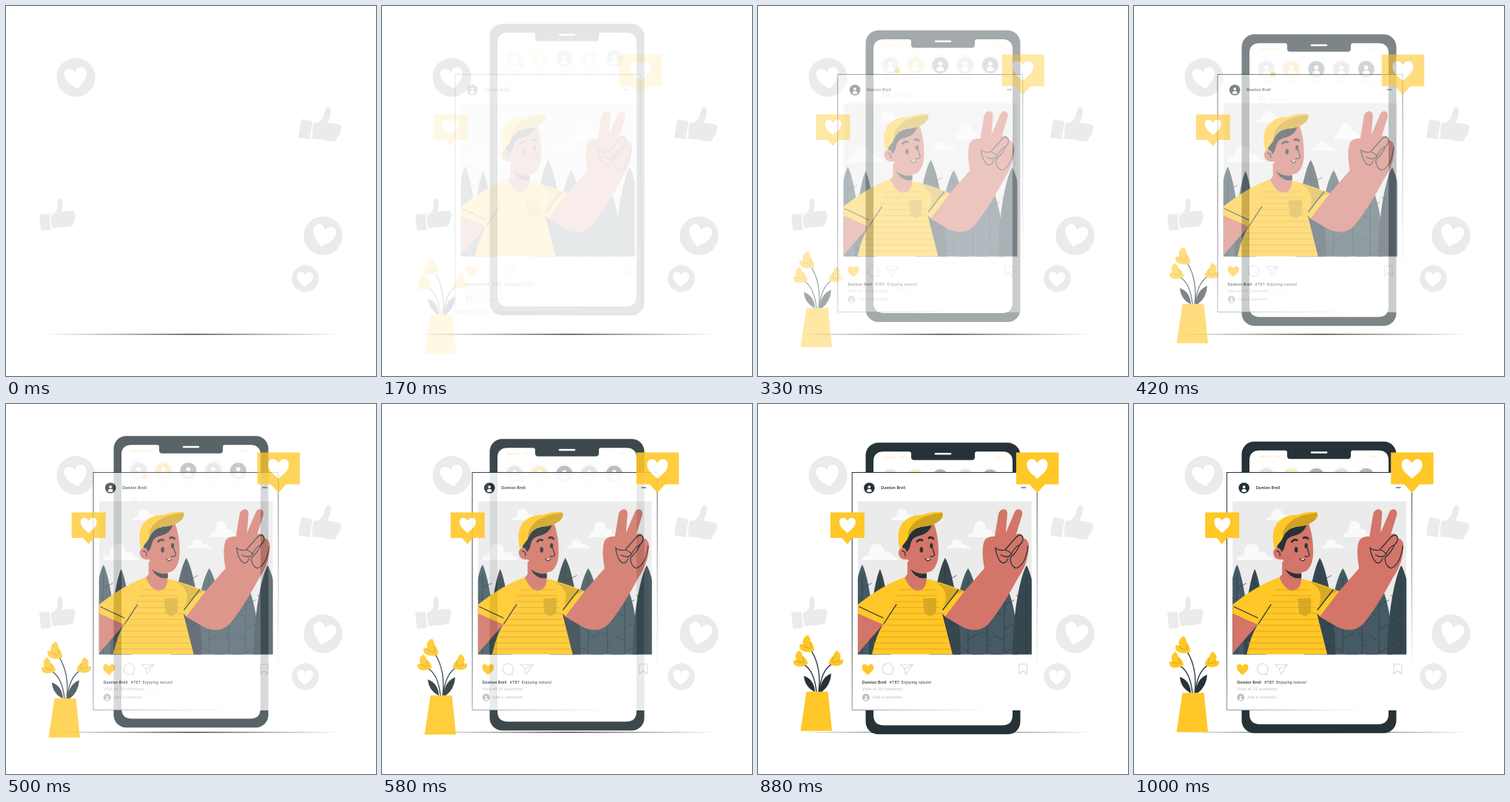
Write an HTML page that moves like this. It is 500 by 500 pixels and loops after 1040 ms.

```html
<!DOCTYPE html>
<html lang="en">
<head>
<meta charset="utf-8">
<title>Photo post</title>
<style>
  html, body { margin: 0; width: 100%; height: 100%; overflow: hidden; background: #fff; }
  svg { display: block; width: 100vw; height: 100vh; }
  text { font: 5.2px Lato, "Open Sans", sans-serif; letter-spacing: .25px; fill: #263238; }
  .bold { font-weight: 700; }
  .pale { fill: #b9b9b9; }
  .yellow { fill: #ffc727; }
  .amber { fill: #cfa320; }
  .skin { fill: #d37568; }
  .dark { fill: #263238; }
  .white { fill: #fff; }
  .grey { fill: #ebebeb; }
  .ink { fill: none; stroke: #263238; stroke-width: 1.3; stroke-linecap: round; stroke-linejoin: round; }
  .brow { stroke-width: 2.8; }
  .icon { fill: none; stroke: #dadada; stroke-width: 1.1; stroke-linejoin: round; }
</style>
</head>
<body>
<svg viewBox="0 0 500 500">
  <defs>
    <linearGradient id="floor">
      <stop stop-color="#555" stop-opacity="0"/>
      <stop offset=".5" stop-color="#444"/>
      <stop offset="1" stop-color="#555" stop-opacity="0"/>
    </linearGradient>
    <linearGradient id="edge" gradientUnits="userSpaceOnUse" x1="125" y1="93" x2="376" y2="413">
      <stop offset=".35" stop-color="#263238"/>
      <stop offset=".9" stop-color="#fff"/>
    </linearGradient>
    <clipPath id="frame"><path d="M133 131.5H368V338.5H133z"/></clipPath>
    <path id="heart" d="M0 14C-4 10-14 4-14-5C-14-14-4-15 0-7C4-15 14-14 14-5C14 4 4 10 0 14z"/>
    <path id="thumb" d="M0 0H15.5V25H0zM17.6 2.3C24 1 29-4 29.5-10C30-16 30-22 34-21.5C39-21 38.5-14 37.5-8L35.5-1H51q5 1 4 5q2 3-1 6q1 4-2 6q0 5-4 7q-10 1-20 0L18.9 23.5Q16 12 17.6 2.3z"/>
    <g id="person" class="white"><circle cy="-.22" r=".3"/><path d="M-.55 .72C-.55 0 .55 0 .55 .72Q0 1.05-.55 .72z"/></g>
    <path id="cloud" d="M0 23Q4 15 11 17Q13 0 25 1Q36 2 37 13Q46 9 50 18Q56 18 58 23z"/>
    <g id="flower">
      <path class="yellow" d="M10 9C5 12-5 12-9 7Q-11 2-9 0Q-7 0-5 1C-7-6-3-11 2-12Q5-8 5-3Q10 1 10 9z"/>
      <path d="M-5 1Q-2 6 5 6M5-3Q4 1 6 6" fill="none" stroke="#dba91f" stroke-width="1.2"/>
    </g>
  </defs>

  <rect x="50" y="442.9" width="404" height="1.5" fill="url(#floor)"/>
  <g class="grey">
    <circle cx="94.5" cy="96.5" r="26.2"/>
    <circle cx="428.5" cy="310.5" r="26.2"/>
    <circle cx="404.5" cy="368.5" r="18.2"/>
    <use href="#thumb" transform="translate(45 282) rotate(-6) scale(.87)"/>
    <use href="#thumb" transform="translate(399 153) rotate(9)"/>
  </g>
  <g class="white">
    <use href="#heart" transform="translate(94.5 97) rotate(-9) scale(1.08)"/>
    <use href="#heart" transform="translate(429.5 310) rotate(14) scale(1.1)"/>
    <use href="#heart" transform="translate(404 369) rotate(3) scale(.77)"/>
  </g>

  <g data-from="0,-30">
    <rect class="dark" x="145.5" y="50.5" width="209" height="394" rx="17"/>
    <path class="white" d="M170 62.500H204Q207 62.500 207 65V70Q207 74 211 74H289Q293 74 293 70V65Q293 62.500 296 62.500H330Q344 62.500 344 76V418Q344 432.500 330 432.500H170Q156 432.500 156 418V76Q156 62.500 170 62.500z"/>
    <path d="M240 65.300H260" stroke="#fff" stroke-width="2.500" stroke-linecap="round"/>
    <path d="M169 70.500H187M191 70.500H198M320 70.500H329" stroke="#fdf0c8" stroke-width="2.500" stroke-dasharray="2.500 1.500"/>
    <g id="stories"></g>
    <circle class="yellow" cx="188" cy="105" r="3.500"/>
    <g opacity=".5">
      <circle cx="173" cy="138" r="5" fill="#ccc"/>
      <use href="#person" transform="translate(173 138) scale(5)"/>
      <text class="pale" x="184" y="140">photo post</text>
      <text class="pale" x="180" y="401">lovely day!</text>
    </g>
  </g>

  <g data-from="0,30">
    <path class="ink" d="M82 391Q86 358 72 335M79 391Q76 362 62 354M83 391Q85 362 100 353"/>
    <path class="dark" d="M77 391Q63 384 62 369Q76 374 77 391zM83 391Q85 371 99 366Q98 382 86 391z"/>
    <use href="#flower" transform="translate(66 326)"/>
    <use href="#flower" transform="translate(56.500 346.500) rotate(-12) scale(.93)"/>
    <use href="#flower" transform="translate(106 346) rotate(8) scale(-.95 .9)"/>
    <path class="yellow" d="M65.500 390.500H94.500L100 443.500H57.500z"/>
  </g>

  <g data-from="-30,0">
    <rect x="125.300" y="92.500" width="250" height="321" fill="#fff" stroke="url(#edge)"/>
    <circle class="dark" cx="148.500" cy="113.500" r="7.300"/>
    <use href="#person" transform="translate(148.500 113.500) scale(6.300)"/>
    <text class="bold" x="164.500" y="115.200">Damion Brell</text>
    <path class="dark" d="M354 112.300h1.500v1.500h-1.500zm2.200 0h1.500v1.500h-1.500zm2.200 0h1.500v1.500h-1.500z"/>

    <g clip-path="url(#frame)">
      <path class="grey" d="M133 131H368V339H133z"/>
      <g fill="#fafafa">
        <use href="#cloud" transform="translate(138 188) scale(.85 1)"/>
        <use href="#cloud" transform="translate(178 141) scale(.62 .7)"/>
        <use href="#cloud" transform="translate(282 157) scale(.65 1)"/>
        <use href="#cloud" transform="translate(252 183) scale(.58 .52)"/>
      </g>
      <g id="trees"></g>

      <!-- raised arm and hand -->
      <path class="skin" d="M268 256L277 253L304 222C302 210 300 196 304 185C307 179 315 179 318 179L323 149C325 140 336 140 335 149L333 174L345 146C349 139 357 143 355 150L347 176Q354 173 356 181Q365 183 364 194C363 212 357 224 349 236C335 262 319 287 309 298Q294 311 274 301L250 287z"/>
      <path class="ink" d="M319 194Q320 205 325 212M319 195Q326 199 332 197L347 180Q353 174 356 180M332 197Q341 200 340 204Q335 209 326 204M340 204Q344 194 352 190Q357 186 356 180M325 212Q331 219 336 209M339 208Q339 219 347 222Q360 217 363 192M339 208Q348 200 352 190"/>

      <!-- far arm, neck, shirt -->
      <path class="skin" d="M133 282L168 297Q152 315 133 337zM200 213H226V238Q228 250 213 253Q200 248 196 235L200 230z"/>
      <path class="dark" d="M204 223Q214 231 226 229V235Q212 238 204 223z"/>
      <path class="yellow" d="M196 234Q204 252 214 253Q226 250 226 236Q250 242 277 253L251 287L247 283L261 338.500H152Q158 312 167 298L133 283V271Q164 246 196 234z"/>
      <path class="amber" d="M221 263L239 262V282L231 287L223 283zM235 239L275 253L265 258L249 273Q259 251 235 239z" opacity=".8"/>
      <path id="stripes" fill="none" stroke="#d5a01c" stroke-width=".8"/>
      <path class="ink" d="M168 297L185 271M135 274L167 289M248 278L269 251"/>

      <!-- head -->
      <path class="skin" d="M199 185Q214 164 236 162Q242 178 242 199Q242 219 232 226Q217 232 204 219L201 210Q190 212 188 202Q188 193 197 194z"/>
      <path class="dark" d="M193 194Q194 177 208 169L233 162Q231 175 213 179Q206 181 204 190Q203 197 199 200Q198 194 193 194z"/>
      <path class="yellow" d="M190 196Q184 175 193 161Q204 149 220 150Q234 145 247 146Q250 151 243 158Q235 165 216 166Q201 173 200 183z"/>
      <path class="amber" d="M201 181Q199 169 211 159Q224 149 247 147Q250 152 243 158Q235 165 216 166Q204 171 201 181z"/>
      <path class="ink brow" d="M213 186Q216 182 220 184M229 181Q232 179 235 182"/>
      <ellipse class="dark" cx="219" cy="197" rx="2.300" ry="3.700"/>
      <ellipse class="dark" cx="232.500" cy="191.500" rx="2.100" ry="3.500"/>
      <path class="ink" d="M234 195L237 204Q235 207 231 206M193 199Q198 199 197 205M224 209Q227 214 231 210"/>
      <path class="white" d="M225 209Q228 210 230 209Q229 213 225 209z"/>
    </g>

    <use class="yellow" href="#heart" transform="translate(146.500 358.500) scale(.56)"/>
    <path class="icon" d="M179 363A7.300 7.300 0 1 0 176 365L180 365.500zM190.500 352H207.500L198 365.500L196 358zM196 358L207.500 352M351 351.500H361.500V365L356.200 360.500L351 365z"/>
    <text x="139" y="378"><tspan class="bold">Damion Brell</tspan> <tspan x="176">#TBT</tspan> <tspan x="192">Enjoying nature!</tspan></text>
    <text class="pale" x="139" y="387">View all 24 comments</text>
    <circle cx="144" cy="396.500" r="5" fill="#bdbdbd"/>
    <use href="#person" transform="translate(144 396.500) scale(4.200)"/>
    <text class="pale" x="153" y="398">Add a comment...</text>
  </g>

  <g data-from="-30,0">
    <path class="yellow" d="M96 146.500H142V181H126L118.800 189.500L111.500 181H96z"/>
    <use class="white" href="#heart" transform="translate(119 163.500) scale(.78)"/>
  </g>
  <g data-from="-30,0">
    <path class="yellow" d="M347 65.500H404.500V108.500H386L375.500 120L365 108.500H347z"/>
    <use class="white" href="#heart" transform="translate(375.500 87)"/>
  </g>
</svg>

<script>
const byId = id => document.getElementById(id);

byId('stories').innerHTML = ['#e6e6e6', '#faecc4', '#b3b8ba', '#e2e2e2', '#b3b8ba'].map((fill, i) => {
  const x = 179 + i * 33.7;
  return `<circle cx="${x}" cy="97.5" r="13" fill="none" stroke="#f6f6f6"/>
    <circle cx="${x}" cy="97.5" r="11" fill="${fill}"/>
    <use href="#person" transform="translate(${x} 97.5) scale(9.5)"/>
    <path d="M${x - 9} 115h18" stroke="#eee" stroke-width="2"/>`;
}).join('');

function tree(x, top, w, fill) {
  let twigs = `M${x} ${top + 12}V338`;
  for (let y = top + 32, i = 0; y < 338; y += 16, i++) {
    const side = i % 2 ? -1 : 1;
    twigs += `M${x} ${y}l${side * w * .75} ${-w * .4}`;
  }
  return `<path fill="${fill}" d="M${x} ${top}C${x + w * .45} ${top + 14} ${x + w} 285 ${x + w} 339H${x - w}C${x - w} 285 ${x - w * .45} ${top + 14} ${x} ${top}z"/>
    <path d="${twigs}" fill="none" stroke="#2c3a41" stroke-width=".7"/>`;
}

const slate = '#455a64', deep = '#37474f';
byId('trees').innerHTML = [
  [139, 217, 17, slate], [163, 223, 15, deep], [308, 232, 21, slate], [282, 222, 21, slate],
  [251, 208, 21, deep], [331, 240, 18, slate], [361, 218, 19, deep]
].map(t => tree(...t)).join('');

let stripes = '';
for (let y = 251; y < 338; y += 8) {
  const left = Math.max(154, 190 - (y - 251) * .5), right = Math.min(259, 238 + (y - 251) * .25);
  stripes += `M${left} ${y}H${right}`;
}
byId('stripes').setAttribute('d', stripes);

// cubic-bezier(.36, -.01, .5, 1.38)
const bezier = (a, b, s) => 3 * (1 - s) ** 2 * s * a + 3 * (1 - s) * s * s * b + s ** 3;
function ease(x) {
  let lo = 0, hi = 1;
  for (let i = 0; i < 24; i++) {
    const mid = (lo + hi) / 2;
    if (bezier(.36, .5, mid) < x) lo = mid; else hi = mid;
  }
  return bezier(-.01, 1.38, lo);
}

const LOOP = 1040, FPS = 24;
const parts = [...document.querySelectorAll('[data-from]')].map(el => ({
  el, from: el.dataset.from.split(',').map(Number)
}));

function draw(now) {
  const step = Math.floor((now % LOOP + 5) * FPS / 1000);
  const p = step < 2 ? 0 : ease((step + .5) / 24.7);
  for (const { el, from: [x, y] } of parts) {
    el.setAttribute('transform', `translate(${x * (1 - p)} ${y * (1 - p)})`);
    el.setAttribute('opacity', Math.min(1, p));
  }
}

let start;
function tick(now) {
  start ??= now;
  draw(now - start);
  requestAnimationFrame(tick);
}
draw(0);
requestAnimationFrame(tick);
</script>
</body>
</html>
```
